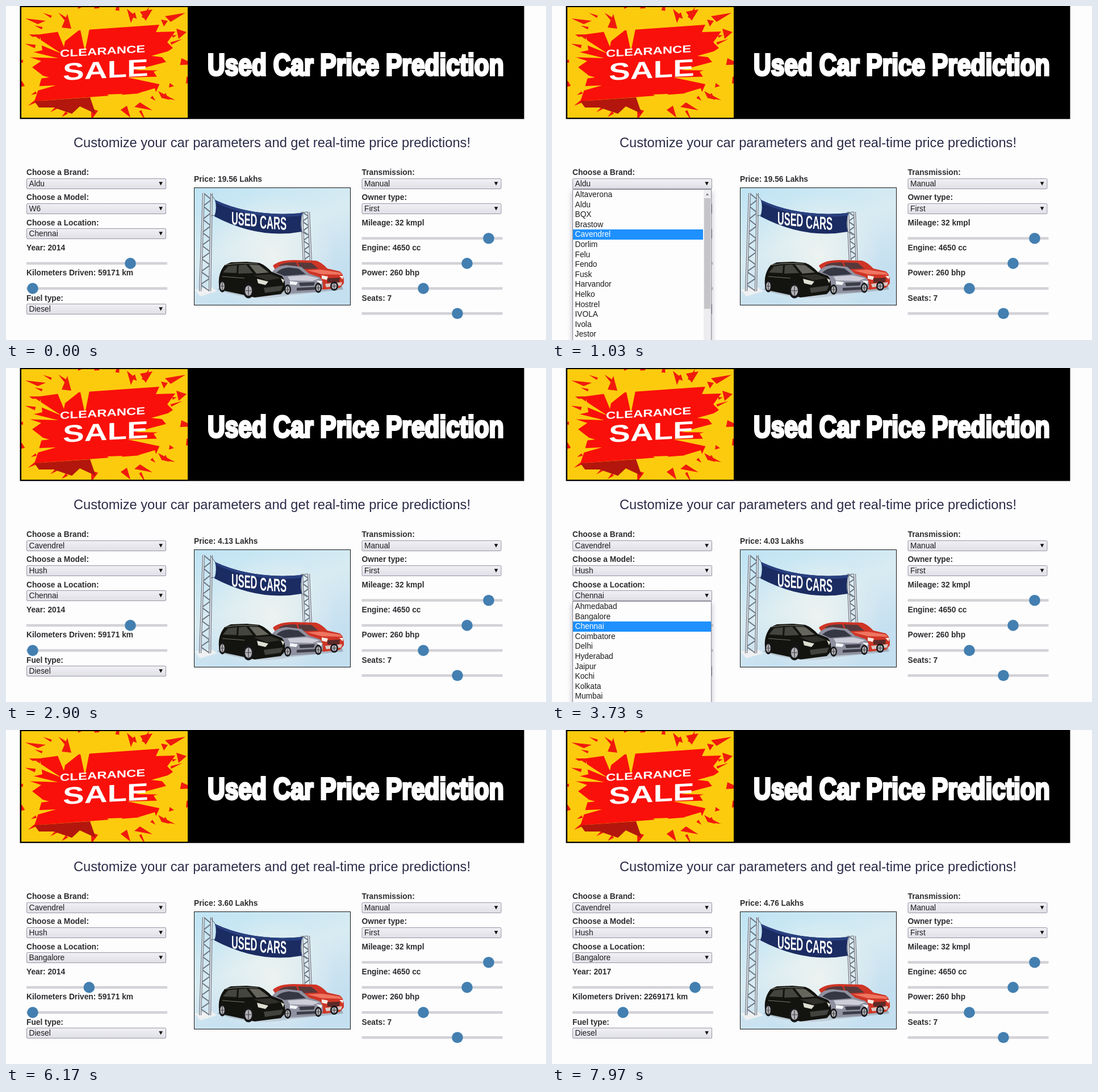
Animation of 951x589 px, one loop 8000 ms. Source, as an HTML page with a canvas:

```html
<!DOCTYPE html>
<html lang="en">
<head>
<meta charset="utf-8">
<title>Used Car Price Prediction</title>
<style>
html, body { margin: 0; width: 100%; height: 100%; overflow: hidden; background: #fdfdfe; }
canvas { display: block; width: 951px; height: 589px; }
</style>
</head>
<body>
<canvas id="stage" width="951" height="589"></canvas>
<script>
const LOOP = 8000;
const SANS = '"Liberation Sans", Arial, sans-serif';
const BODY = '13.75px ' + SANS;
const BOLD = 'bold ' + BODY;
const ROW = 17.6;

const brands = ['Altaverona', 'Aldu', 'BQX', 'Brastow', 'Cavendrel', 'Dorlim', 'Felu', 'Fendo', 'Fusk',
  'Harvandor', 'Helko', 'Hostrel', 'IVOLA', 'Ivola', 'Jestor', 'Kembra'];
const models = ['Mist', 'Velda', 'Hush', 'Solenda', 'Glint', 'Luneva', 'Merry', 'Drift', 'Ulmo'];
const cities = ['Ahmedabad', 'Bangalore', 'Chennai', 'Coimbatore', 'Delhi', 'Hyderabad', 'Jaipur',
  'Kochi', 'Kolkata', 'Mumbai', 'Pune'];

// Each entry is [start time, value].
const track = {
  brand: [[0, 'Aldu'], [1300, 'Cavendrel']],
  model: [[0, 'W6'], [1400, 'Mist'], [2750, 'Hush']],
  city: [[0, 'Chennai'], [4300, 'Bangalore']],
  price: [[0, '19.56'], [1500, '4.13'], [2950, '4.03'], [4600, '3.60'], [6540, '2.14'], [7400, '4.81'], [7930, '4.76']],
  year: [[0, 2014], [6500, 2004], [7350, 2017]],
  km: [[0, 59171], [7880, 2269171]],
  yearX: [[5650, 219], [6500, 110], [6750, 110], [7300, 252]],
  kmX: [[7530, 47], [7850, 125]]
};

const lists = [
  { row: 0, items: brands, from: 420, to: 1300, hover: [[550, 1], [950, 4]], scroll: true },
  { row: 1, items: models, from: 1850, to: 2750, hover: [[2100, 0], [2500, 2]] },
  { row: 2, items: cities, from: 3550, to: 4300, hover: [[3800, 2], [4050, 1]] }
];

const canvas = document.getElementById('stage');
const view = canvas.getContext('2d');
let ctx = view;

function valueAt(keys, t) {
  let value = keys[0][1];
  for (const [start, v] of keys) if (t >= start) value = v;
  return value;
}

function tween(keys, t) {
  if (t <= keys[0][0]) return keys[0][1];
  for (let i = 1; i < keys.length; i++) {
    const [a, from] = keys[i - 1], [b, to] = keys[i];
    if (t < b) {
      const p = (t - a) / (b - a);
      return from + (to - from) * p * p * (3 - 2 * p);
    }
  }
  return keys[keys.length - 1][1];
}

function seeded(seed) {
  return () => (seed = (seed * 16807) % 2147483647) / 2147483647;
}

function box(fill, x, y, w, h) {
  ctx.fillStyle = fill;
  ctx.fillRect(x, y, w, h);
}

function shape(fill, d) {
  ctx.fillStyle = fill;
  ctx.fill(new Path2D(d));
}

function line(color, width, d) {
  ctx.strokeStyle = color;
  ctx.lineWidth = width;
  ctx.stroke(new Path2D(d));
}

function oval(fill, x, y, rx, ry = rx) {
  ctx.fillStyle = fill;
  ctx.beginPath();
  ctx.ellipse(x, y, rx, ry, 0, 0, Math.PI * 2);
  ctx.fill();
}

function text(str, x, y, font = BODY, color = '#1c1c1e') {
  ctx.font = font;
  ctx.fillStyle = color;
  ctx.fillText(str, x, y);
}

function slanted(str, x, y, size, wide, slope) {
  ctx.save();
  ctx.transform(wide, slope * wide, 0, 1, x, y);
  text(str, 0, 0, `bold ${size}px ${SANS}`, '#fff');
  ctx.restore();
}

// A ring of slim triangles that fly outwards from the middle of the sign.
function shards(color, count, rx, ry, reach, rnd) {
  for (let i = 0; i < count; i++) {
    const a = (i + rnd() * .6) / count * Math.PI * 2;
    const r = .9 + rnd() * .25, len = reach * (.4 + rnd()), w = 2 + rnd() * 5;
    const x = 172 + Math.cos(a) * rx * r, y = 98 + Math.sin(a) * ry * r;
    const aim = Math.atan2(y - 98, x - 172) + rnd() * .6 - .3;
    const c = Math.cos(aim), s = Math.sin(aim);
    shape(color, `M${x + c * len} ${y + s * len}L${x - s * w} ${y + c * w} ${x + s * w} ${y - c * w}Z`);
  }
}

function drawSale() {
  const rnd = seeded(41);
  ctx.save();
  ctx.beginPath();
  ctx.rect(27, 2, 293, 195);
  ctx.clip();
  box('#fdcb0e', 27, 2, 293, 195);
  shards('#f01a0c', 30, 136, 88, 18, rnd);
  shape('#f9100a', 'M60 50L96 45 104 62 128 43 270 33 264 46 298 45 284 64 294 74 273 88 288 106 260 116 ' +
    '272 134 264 152 50 168 56 150 64 122 46 108 62 97 29 86 64 78Z');
  shape('#fdcb0e', 'M27 76L92 92 27 90ZM27 112L76 126 27 132ZM130 38L139 80 147 40ZM30 56L98 84 52 54Z' +
    'M88 38L102 72 108 42ZM296 95L228 113 296 114ZM290 124L214 126 280 140ZM292 78L256 88 290 92Z' +
    'M178 156L194 167 205 155ZM232 154L262 145 266 158ZM40 142L88 140 46 152Z');
  shape('#f01a0c', 'M213 5L226 16 220 30ZM236 10L258 6 246 26ZM280 18L316 12 290 28ZM98 38L108 14 115 40Z' +
    'M34 22L70 26 56 32ZM300 40L318 46 304 58ZM236 170L258 184 226 178ZM268 150L298 166 274 162Z');
  shape('#b3160c', 'M50 168L148 161 158 190 130 177 116 190 84 179 58 179Z');
  slanted('CLEARANCE', 95, 90, 18, 1.33, -.057);
  slanted('SALE', 100, 131, 42.5, 1.33, -.053);
  ctx.restore();
}

function drawHeader() {
  box('#000', 24.5, 0, 888, 199.3);
  drawSale();
  ctx.save();
  ctx.transform(.797, 0, 0, 1, 355, 122.3);
  const title = 'Used Car Price Prediction';
  text(title, 0, 0, 'bold 53.3px ' + SANS, '#fff');
  ctx.strokeStyle = '#fff';
  ctx.lineWidth = 4;
  ctx.miterLimit = 2;
  ctx.strokeText(title, 0, 0);
  ctx.restore();
  text('Customize your car parameters and get real-time price predictions!', 119, 249, '23.65px ' + SANS, '#2b2b48');
}

function truss(x1, y1, w1, x2, y2, w2, n) {
  let zig = `M${x1} ${y1}`;
  for (let i = 1; i <= n; i++) {
    const p = i / n, side = i % 2 ? w1 + (w2 - w1) * p : 0;
    zig += `L${x1 + (x2 - x1) * p + side} ${y1 + (y2 - y1) * p}`;
  }
  const rails = `M${x1} ${y1}L${x2} ${y2}M${x1 + w1} ${y1}L${x2 + w2} ${y2}`;
  line('#6f7783', 2, zig);
  line('#6f7783', 4.2, rails);
  line('#e8eaee', 1.8, rails);
}

function wheel(x, y, rx, ry) {
  oval('#17171a', x, y, rx, ry);
  oval('#b4b4b8', x, y, rx * .65, ry * .67);
  line('#3c3c42', 1.2, `M${x} ${y - ry * .6}V${y + ry * .6}M${x - rx * .6} ${y}H${x + rx * .6}`);
}

function drawCars() {
  const shade = ctx.createLinearGradient(0, 490, 0, 520);
  shade.addColorStop(0, '#8b9aa8');
  shade.addColorStop(1, '#d3e2ec');
  shape(shade, 'M372 500Q440 524 500 510L594 500 590 490 400 480Z');

  shape('#cf3526', 'M470 458Q480 448 506 448L546 449Q556 452 566 463L588 468Q596 474 595 489L588 497 560 500 490 490Z');
  shape('#56393b', 'M480 458Q488 452 505 452L538 453 550 463 500 465Z');
  line('#cf3526', 2.5, 'M512 451L518 466');
  shape('#ef7560', 'M530 466L556 465 588 470 592 474 556 473Z');
  shape('#f6ece4', 'M556 475L567 477 565 483 556 481ZM587 476L594 476 593 482Z');
  shape('#5c2a28', 'M566 480L588 479 587 487 566 488Z');
  shape('#d8c8c2', 'M562 490L592 487 590 493 564 496Z');
  wheel(578, 494, 7, 8);

  shape('#8f90a0', 'M468 470Q476 458 494 457L520 460 534 472 552 478Q560 485 558 497L550 504 500 507Z');
  shape('#353843', 'M476 470Q484 462 498 461L515 463 528 473 490 476Z');
  shape('#cdced8', 'M496 477L530 475 552 480 540 485 500 484Z');
  shape('#f4f5f8', 'M500 485L514 487 511 492 500 491ZM546 484L557 485 555 491Z');
  shape('#3c3d47', 'M516 488L544 487 542 493 518 494ZM512 497L555 495 551 500 512 502Z');
  wheel(550, 497, 6, 9);
  wheel(496, 500, 6, 9);

  shape('#13130f', 'M375 492Q373 472 385 457L396 452 424 451 446 453Q457 457 468 469L486 476Q493 484 491 500L484 508 ' +
    '438 514 412 508 384 502Z');
  shape('#45453f', 'M382 470L391 459 407 457 406 471ZM410 457L423 456 435 471 409 472Z');
  shape('#66665e', 'M428 456L446 457 463 470 441 472Z');
  shape('#302f2a', 'M436 475L466 473 484 480 460 484Z');
  shape('#dedfd2', 'M442 481L462 486 457 492 444 489ZM484 480L490 483 488 489Z');
  shape('#42423e', 'M454 497L488 493 484 502 456 506Z');
  line('#77776c', 1.2, 'M381 477L420 480M386 457Q410 452 444 455');
  wheel(381, 494, 6, 11);
  wheel(427, 502, 9.5, 13.5);
}

function drawPhoto() {
  ctx.save();
  ctx.beginPath();
  ctx.rect(331, 320, 276, 208);
  ctx.clip();
  const sky = ctx.createLinearGradient(340, 320, 420, 528);
  sky.addColorStop(0, '#bfe4f4');
  sky.addColorStop(.55, '#d8ebf2');
  sky.addColorStop(1, '#c4dff0');
  box(sky, 331, 320, 276, 208);
  const glow = ctx.createRadialGradient(470, 440, 5, 470, 440, 110);
  glow.addColorStop(0, 'rgba(240,244,240,.85)');
  glow.addColorStop(1, 'rgba(240,244,240,0)');
  box(glow, 331, 320, 276, 208);

  shape('#eef0f2', 'M332 500L362 496 372 503 342 512Z');
  truss(348, 330, 14, 342, 503, 17, 15);
  truss(521, 363, 12, 525, 456, 12, 11);
  line('#555e70', 1, 'M361 332L369 343M361 370L368 369M520 365L531 363M520 397L530 404');
  shape('#1b2c62', 'M368 342Q434 373 522 365Q517 382 521 398Q445 412 367 371Q372 356 368 342Z');
  shape('#294080', 'M368 342Q434 373 522 365L521 370Q434 378 370 347Z');
  slanted('USED', 397, 385, 32, .51, .1);
  slanted('CARS', 447, 392, 32, .52, .06);
  drawCars();
  ctx.restore();
  ctx.strokeStyle = '#151515';
  ctx.lineWidth = 1;
  ctx.strokeRect(331.5, 320.5, 275, 207);
}

const labelY = row => 298 + 44.3 * row;
const selectY = row => Math.round(304 + 44.2 * row);

function label(str, x, row) {
  text(str, x, labelY(row), BOLD, '#2d2d30');
}

function select(caption, value, x, row) {
  const y = selectY(row);
  label(caption, x, row);
  const face = ctx.createLinearGradient(0, y, 0, y + 19);
  face.addColorStop(0, '#f0f0f5');
  face.addColorStop(1, '#dfdfe6');
  ctx.fillStyle = face;
  ctx.strokeStyle = '#9797a4';
  ctx.lineWidth = 1;
  ctx.beginPath();
  ctx.roundRect(x + .5, y + .5, 245, 18, 1.5);
  ctx.fill();
  ctx.stroke();
  text(value, x + 4.5, y + 14.3);
  shape('#111', `M${x + 233.3} ${y + 6.3}h6.6l-3.3 6.2Z`);
}

function slider(caption, x, row, knob) {
  const y = 321.3 + 44.2 * row;
  label(caption, x, row);
  box('#d2d2d7', x, y - 2.3, 248, 4.6);
  oval('#437fb0', knob, y, 9.8);
}

function dropdown(list, t) {
  const top = selectY(list.row) + 19, count = list.items.length;
  const height = list.scroll ? 300 : count * ROW + 2;
  const hot = Math.round(tween(list.hover, t));
  ctx.save();
  ctx.shadowColor = 'rgba(40,40,70,.35)';
  ctx.shadowBlur = 9;
  ctx.shadowOffsetY = 4;
  box('#fdfdfe', 36, top, 245, height);
  ctx.restore();
  ctx.strokeStyle = '#8c8c96';
  ctx.lineWidth = 1;
  ctx.strokeRect(36.5, top + .5, 244, height - 1);
  list.items.forEach((item, i) => {
    const y = top + i * ROW;
    if (i === hot) box('#1e90ff', 37, Math.round(y + 1), list.scroll ? 229 : 243, 18);
    text(item, 40.5, y + 14, BODY, i === hot ? '#fff' : '#1c1c1e');
  });
  if (list.scroll) {
    box('#ededf0', 267, top + 1, 13, height);
    box('#c4c4c9', 268, 339, 11, 195);
    shape('#8a8a90', 'M270.5 334h6l-3 -4Z');
  }
}

// The parts that never change are painted once.
const backdrop = document.createElement('canvas');
backdrop.width = 951;
backdrop.height = 589;

function drawBackdrop() {
  ctx = backdrop.getContext('2d');
  box('#fdfdfe', 0, 0, 951, 589);
  drawHeader();
  drawPhoto();
  select('Fuel type:', 'Diesel', 36, 5);
  select('Transmission:', 'Manual', 626.5, 0);
  select('Owner type:', 'First', 626.5, 1);
  slider('Mileage: 32 kmpl', 626.5, 2, 850);
  slider('Engine: 4650 cc', 626.5, 3, 812);
  slider('Power: 260 bhp', 626.5, 4, 735);
  slider('Seats: 7', 626.5, 5, 795);
  ctx = view;
}

function draw(t) {
  const now = name => valueAt(track[name], t);
  ctx.drawImage(backdrop, 0, 0);
  select('Choose a Brand:', now('brand'), 36, 0);
  select('Choose a Model:', now('model'), 36, 1);
  select('Choose a Location:', now('city'), 36, 2);
  slider('Year: ' + now('year'), 36, 3, tween(track.yearX, t));
  slider(`Kilometers Driven: ${now('km')} km`, 36, 4, tween(track.kmX, t));
  text(`Price: ${now('price')} Lakhs`, 331, 310, BOLD, '#2d2d30');
  for (const list of lists) if (t >= list.from && t < list.to) dropdown(list, t);
}

const start = performance.now();
function frame() {
  draw((performance.now() - start) % LOOP);
  requestAnimationFrame(frame);
}
drawBackdrop();
frame();
</script>
</body>
</html>
```
